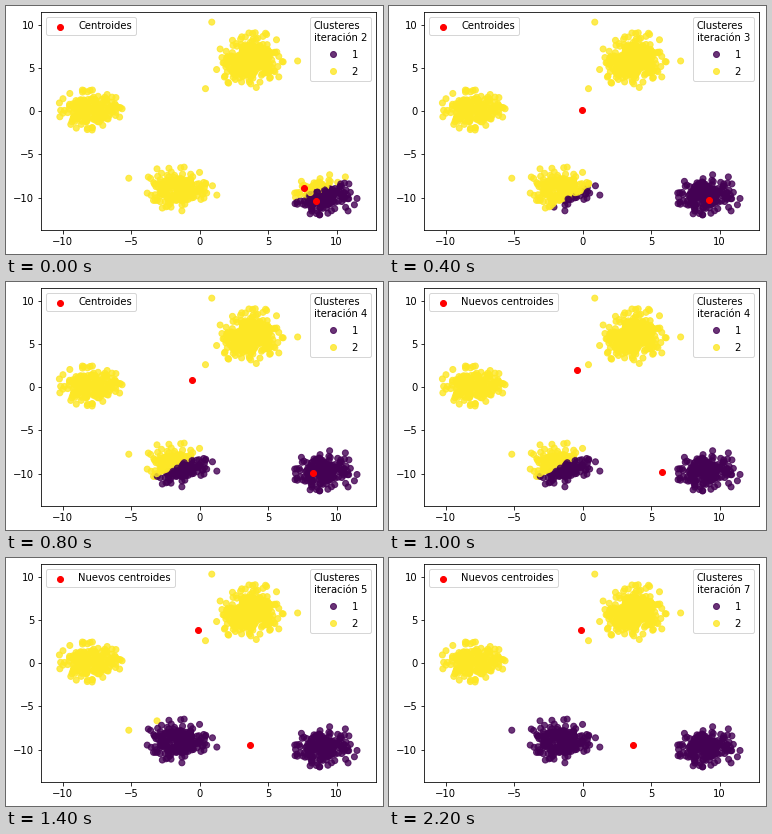
A matplotlib script that plays this animation: 377 px wide and 248 px high, repeating every 2400 ms.

```python
import matplotlib.pyplot as plt
import numpy as np
from matplotlib.animation import FuncAnimation

W, H, DPI = 377, 248, 72
STEPS = 6
rng = np.random.default_rng(7)


def blob(center, n=200, reach=2.7):
    """Unit normal cloud without its farthest tail."""
    z = rng.normal(size=(2 * n, 2))
    return center + z[np.hypot(*z.T) < reach][:n]


# Five equal blobs, two of them overlapping, and a few far points
centers = np.array([(3.75, 5.35), (3.75, 6.55), (-7.95, 0.2),
                    (-1.68, -8.95), (9.1, -9.75)])
far = [(0.88, 10.29), (7.15, 5.8), (0.42, 2.6), (-5.18, -7.75), (1.25, -9.7)]
points = np.vstack([blob(c) for c in centers] + [far])
rng.shuffle(points)

# Path of the centroid pair until it settles
path = np.array([
    [(8.47, -10.37), (7.6, -8.87)],
    [(9.2, -10.25), (-0.07, 0.15)],
    [(8.25, -9.9), (-0.58, 0.84)],
    [(5.77, -9.8), (-0.44, 2.0)],
    [(3.65, -9.45), (-0.15, 3.85)],
])


def pair_at(step):
    return path[min(step, len(path) - 1)]


def assign(pair):
    dist = np.linalg.norm(points[:, None] - pair, axis=2)
    return dist.argmin(axis=1) + 1


plt.rcParams.update({"font.family": "DejaVu Sans", "font.size": 10})
fig = plt.figure(figsize=(W / DPI, H / DPI), dpi=DPI, facecolor="white")
ax = fig.add_axes([35.3 / W, 24.3 / H, 334.8 / W, 217.44 / H])
ax.set(xlim=(-11.57, 12.88), ylim=(-13.7, 11.43),
       xticks=range(-10, 11, 5), yticks=range(-10, 11, 5))

cloud = ax.scatter(*points.T, c=assign(pair_at(0)), cmap="viridis", alpha=0.8)
marks = ax.scatter(*pair_at(0).T, c="red", label="Centroides")

clusters = ax.legend(*cloud.legend_elements(), loc="upper right",
                     title="Clusteres\niteración 2")
ax.add_artist(clusters)
caption = ax.legend(loc="upper left").get_texts()[0]


def update(i):
    step, moved = divmod(i, 2)
    cloud.set_array(assign(pair_at(step)))
    marks.set_offsets(pair_at(step + moved))
    caption.set_text("Nuevos centroides" if moved else "Centroides")
    clusters.get_title().set_text(f"Clusteres\niteración {step + 2}")
    return cloud, marks, caption, clusters


anim = FuncAnimation(fig, update, frames=2 * STEPS, interval=200, repeat=True)
plt.show()
```
